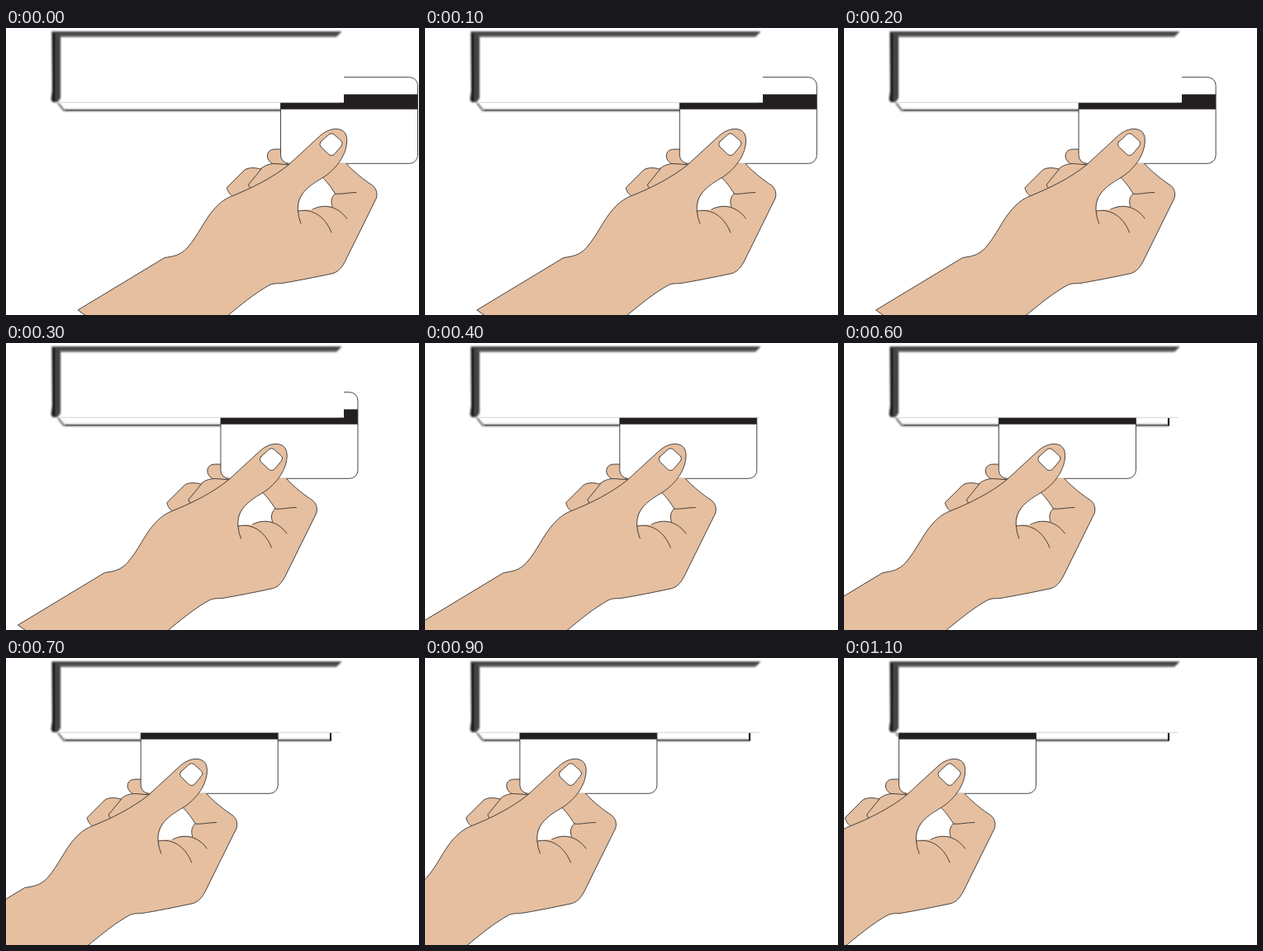
Write an HTML page that moves like this. It is 500 px wide and 348 px high and loops after 1150 ms.

```html
<!DOCTYPE html>
<html lang="en">
<head>
<meta charset="utf-8">
<title>Card swipe</title>
<style>
  html, body { margin: 0; width: 100%; height: 100%; overflow: hidden; background: #fff; }
  svg { display: block; width: 500px; height: 348px; }
  .skin { fill: #e5bf9f; }
  .ink { stroke: #363232; stroke-width: .9; stroke-linejoin: round; stroke-linecap: round; }
  .line { fill: none; }
  .white { fill: #fff; }
</style>
</head>
<body>
<svg viewBox="0 0 500 348">
  <defs>
    <filter id="soft" filterUnits="userSpaceOnUse" x="40" y="-5" width="380" height="115">
      <feGaussianBlur stdDeviation="0.9"/>
    </filter>
    <linearGradient id="side">
      <stop offset="0" stop-color="#333"/>
      <stop offset=".3" stop-color="#080808"/>
      <stop offset=".5" stop-color="#484848"/>
      <stop offset="1" stop-color="#3c3c3c"/>
    </linearGradient>
    <linearGradient id="top" x2="0" y2="1">
      <stop offset="0" stop-color="#333"/>
      <stop offset=".5" stop-color="#484848"/>
      <stop offset="1" stop-color="#777"/>
    </linearGradient>
    <clipPath id="cardShape"><rect x="332.5" y="59.7" width="166" height="104.6" rx="10"/></clipPath>
  </defs>

  <!-- slot lip below the reader -->
  <path d="M62 90.5H405" stroke="#bbb" stroke-width="1.2" fill="none"/>
  <path d="M63 91L70 99.8H393" stroke="#555" stroke-width="2" fill="none" filter="url(#soft)"/>
  <path d="M72 99.8H393" stroke="#444" stroke-width="1" fill="none"/>
  <path d="M393 91V100.5" stroke="#222" stroke-width="2.2" fill="none"/>

  <g id="card">
    <path class="skin ink" d="M340 147H326C319 147 316 151 316.500 156C317 161 321 164 326 166L340 170Z"/>
    <path class="skin ink" d="M275 204.500C271 202 268 198 267.500 193.500L289 172C294 169 301 169 308 171
      C313 167 318 164.500 326 164.500L345 166L310 200Z"/>
    <path class="line ink" d="M309 171L293.500 190Q294 193 297 195"/>
    <g clip-path="url(#cardShape)">
      <rect class="white" x="332" y="59" width="167" height="106"/>
      <rect x="332" y="80.400" width="167" height="18.200" fill="#231f20"/>
    </g>
    <rect class="line ink" x="332.500" y="59.700" width="166" height="104.600" rx="10"/>
  </g>

  <!-- reader body hides the upper part of the card -->
  <rect class="white" x="62" y="8" width="347" height="82.500"/>
  <path d="M66 90H403" stroke="#ddd" stroke-width=".6"/>
  <g filter="url(#soft)">
    <path d="M55 4.200H406.500L400 11H60Z" fill="url(#top)"/>
    <path d="M55.500 5L66 10V85L62.500 90H57L54.500 87L56 76Z" fill="url(#side)"/>
  </g>

  <g id="hand">
    <path class="skin" d="M383.500 181.500L403 163.900H412L425 185L410 215L398 201Z"/>
    <path class="skin" d="M97 349L87 342L192 278.500C202 277 211 276 220 266
      C233 251 240 233 252 219.500C258 213 264 207.500 273 204C298 194 322 182 342 166
      L381 130C388 124 397 121 404 123C411 125 413.500 131 412.500 140C411 155 400 171 383.500 181.500
      L412 164.500C418 171 429 181 441 189C448 193 450 199 448.500 206L411 282C407 290 403 295 396 297.500
      C375 302 350 307 333 309.700C327 309.700 323 309.700 319 311.700C301 321.500 284 336 268 349Z"/>
    <path class="white" d="M383.500 181.500C367 190 354 201 353.500 222C360 220 366 220 371 220.500
      C378 216 386 215 395 216.500C393 210 394 205 398.500 201C393 192 389 187 383.500 181.500Z"/>
    <path class="line ink" d="M97 349L87 342L192 278.500C202 277 211 276 220 266
      C233 251 240 233 252 219.500C258 213 264 207.500 273 204C298 194 322 182 342 166
      L381 130C388 124 397 121 404 123C411 125 413.500 131 412.500 140C411 155 400 171 383.500 181.500
      C362 194 352 204 353.500 222Q354 230 357 237
      M412 164.500C418 171 429 181 441 189C448 193 450 199 448.500 206L411 282C407 290 403 295 396 297.500
      C375 302 350 307 333 309.700C327 309.700 323 309.700 319 311.700C301 321.500 284 336 268 349
      M353.500 222C372 218 387 230 394 248
      M371 220C386 212 403 217 412.500 231
      M383.500 181.500C389 187 393 192 398.500 201C394 205 393 210 395 216.500
      M398.500 201C406 202 413 199.500 424 199.500"/>
    <path class="white ink" d="M381 138L391 129Q394 126.500 397 129L406 137Q408.500 140 406 143L398.500 152
      Q395 156 391 153.500L381 144Q378.500 141 381 138Z"/>
  </g>
</svg>
<script>
  const STEP_MS = 50, STEPS = 23, TRAVEL = 266;
  const moving = ["card", "hand"].map(id => document.getElementById(id));
  const start = performance.now();

  function draw(time) {
    const step = Math.floor(time / STEP_MS) % STEPS;
    const x = -TRAVEL * step / (STEPS - 1);
    moving.forEach(part => part.setAttribute("transform", `translate(${x.toFixed(2)} 0)`));
  }

  function tick(now) {
    draw(Math.max(0, now - start));
    requestAnimationFrame(tick);
  }

  draw(0);
  requestAnimationFrame(tick);
</script>
</body>
</html>
```
